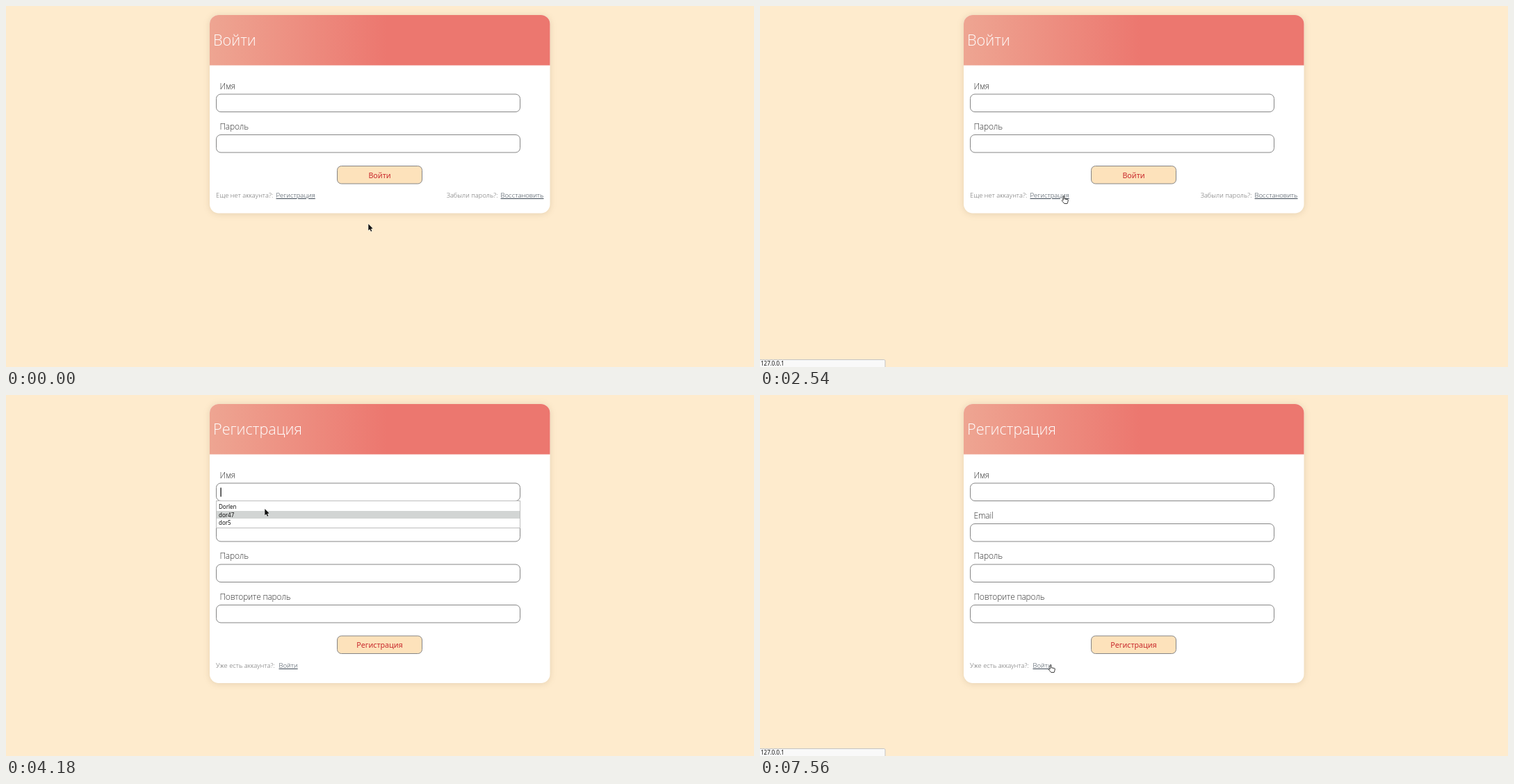
An HTML page that plays this animation: 1076x520 px, repeating every 8000 ms.

```html
<!DOCTYPE html>
<html lang="ru">
<head>
<meta charset="utf-8">
<title>Регистрация</title>
<style>
  html, body { margin: 0; width: 100%; height: 100%; overflow: hidden; background: #feebcd; }
  svg { display: block; width: 1076px; height: 520px; }

  text { font-family: "Open Sans", "Noto Sans", sans-serif; font-weight: 300; }
  .title { font-size: 21.6px; fill: #fff; }
  .label { font-size: 12px; letter-spacing: -.2px; fill: #333; }
  .note { font-size: 9.4px; fill: #666; }
  .link { font-size: 9.5px; fill: #34404c; text-decoration: underline; }
  .action { font: 400 10.7px "Noto Sans", sans-serif; fill: #c8282c; text-anchor: middle; }
  .small { font: 400 8px "Noto Sans", sans-serif; fill: #111; }
  .end { text-anchor: end; }

  .card { fill: #fff; filter: drop-shadow(0 1px 5px rgba(90, 60, 20, .15)); }
  .field { fill: #fff; stroke: #858585; }
  .button { fill: #fde2bb; stroke: #858585; }
  .panel { fill: #f9f9f9; stroke: #c4c4c4; }

  .anim { animation: 8s step-end infinite; }
  #login { animation-name: login; }
  #register { animation-name: register; }
  #caret { animation-name: caret; }
  #list { animation-name: list; }
  #active { animation-name: active; }
  #wide { animation-name: wide; }
  #narrow { animation-name: narrow; }
  #cursor { animation-name: move; }
  #arrow { animation-name: arrow; }
  #hand { animation-name: hand; }

  @keyframes login { 0% { opacity: 1 } 37%, 100% { opacity: 0 } }
  @keyframes register { 0% { opacity: 0 } 37%, 100% { opacity: 1 } }
  @keyframes caret { 0% { opacity: 1 } 78.75%, 100% { opacity: 0 } }
  @keyframes list { 0%, 87.75%, 100% { opacity: 0 } 42.25% { opacity: 1 } }
  @keyframes active { 0%, 56.25%, 100% { opacity: 0 } 52.25% { opacity: 1 } }
  @keyframes wide { 0%, 37% { opacity: 0 } 31.75%, 94.5%, 100% { opacity: 1 } }
  @keyframes narrow { 0%, 94.5%, 100% { opacity: 0 } 78.75% { opacity: .6 } 83.75% { opacity: 1 } }
  @keyframes arrow { 0%, 37% { opacity: 1 } 18.4%, 75%, 100% { opacity: 0 } }
  @keyframes hand { 0%, 37% { opacity: 0 } 18.4%, 75%, 100% { opacity: 1 } }
  @keyframes move {
    0% { transform: translate(521px, 314px) }
    6.5% { transform: translate(521px, 314px); animation-timing-function: linear }
    15.5% { transform: translate(459px, 285px); animation-timing-function: linear }
    16% { transform: translate(453px, 283px) }
    17% { transform: translate(453px, 283px); animation-timing-function: linear }
    19.5% { transform: translate(437px, 274px) }
    37% { transform: translate(437px, 275px) }
    42.25% { transform: translate(437px, 274px) }
    47% { transform: translate(417px, 235px) }
    52.25% { transform: translate(372px, 164px) }
    56.25% { transform: translate(348px, 238px) }
    61.25% { transform: translate(364px, 392px) }
    65% { transform: translate(421px, 424px) }
    70.25% { transform: translate(430px, 400px) }
    75% { transform: translate(418px, 390px) }
    87.75%, 100% { transform: translate(418px, 389px) }
  }
</style>
</head>
<body>
<svg viewBox="0 0 1076 520">
  <defs>
    <linearGradient id="coral">
      <stop offset="0" stop-color="#eea592"/>
      <stop offset=".52" stop-color="#ec776f"/>
    </linearGradient>
    <path id="head" fill="url(#coral)" d="M293 85.5V26a13 13 0 0 1 13-13H769.5a13 13 0 0 1 13 13V85.5Z"/>
    <rect id="field" class="field" x="302.5" y=".5" width="437" height="25.5" rx="6.5"/>
    <rect id="button" class="button" x="476.5" y=".5" width="122" height="25.5" rx="6"/>
  </defs>

  <rect width="1076" height="520" fill="#feebcd"/>

  <g id="login" class="anim">
    <rect class="card" x="293" y="13" width="489.5" height="285.5" rx="13"/>
    <use href="#head"/>
    <text class="title" x="298" y="57">Войти</text>
    <text class="label" x="307.5" y="119.5">Имя</text>
    <use href="#field" y="126.5"/>
    <text class="label" x="307.5" y="178">Пароль</text>
    <use href="#field" y="185"/>
    <use href="#button" y="230"/>
    <text class="action" x="537.5" y="247.5">Войти</text>
    <text class="note" x="302" y="276">Еще нет аккаунта?:</text>
    <text class="link" x="388.5" y="276">Регистрация</text>
    <text class="note end" x="707.5" y="276">Забыли пароль?:</text>
    <text class="link end" x="773.5" y="276">Восстановить</text>
  </g>

  <g id="register" class="anim">
    <rect class="card" x="293" y="13" width="489.5" height="402" rx="13"/>
    <use href="#head"/>
    <text class="title" x="298" y="57">Регистрация</text>
    <text class="label" x="307.5" y="119.5">Имя</text>
    <use href="#field" y="126.5"/>
    <text class="label" x="307.5" y="178">Email</text>
    <use href="#field" y="185"/>
    <text class="label" x="307.5" y="236">Пароль</text>
    <use href="#field" y="243.5"/>
    <text class="label" x="307.5" y="294.5">Повторите пароль</text>
    <use href="#field" y="302"/>
    <use href="#button" y="346.5"/>
    <text class="action" x="537.5" y="364">Регистрация</text>
    <text class="note" x="302" y="393">Уже есть аккаунта?:</text>
    <text class="link" x="392.5" y="393">Войти</text>
    <rect id="caret" class="anim" x="308.5" y="133.5" width="1.2" height="13"/>

    <g id="list" class="anim">
      <rect x="302.5" y="152.5" width="437" height="39" fill="#fff" stroke="#bdbdbd"/>
      <rect id="active" class="anim" x="303" y="167" width="436" height="11" fill="#d2d5d4"/>
      <text class="small" x="306" y="164.3">Dorlen</text>
      <text class="small" x="306" y="175.6">dor47</text>
      <text class="small" x="306" y="186.9">dor5</text>
    </g>
  </g>

  <g id="narrow" class="anim">
    <path class="panel" d="M-1 509.5H82a1.5 1.5 0 0 1 1.5 1.5V521H-1Z"/>
    <text class="small" x="1" y="518.3">127.0.0.1:8000/login/</text>
  </g>
  <g id="wide" class="anim">
    <path class="panel" d="M-1 509.5H178.5a1.5 1.5 0 0 1 1.5 1.5V521H-1Z"/>
    <text class="small" x="1" y="518.3">127.0.0.1</text>
  </g>

  <g id="cursor" class="anim">
    <path id="arrow" class="anim" fill="#111" stroke="#fff" stroke-width=".8" paint-order="stroke"
      d="M.3 0V9.3L2.4 7.4 3.9 10.8 5.4 10.2 3.9 6.9 6.6 6.6Z"/>
    <path id="hand" class="anim" fill="#fff" stroke="#222" stroke-width=".9" stroke-linejoin="round"
      d="M-.8 5.8V.6a.9.9 0 0 1 1.8 0V3.8L5.3 4.6a1.2 1.2 0 0 1 1 1.3L5.7 8.8 5 10.6H.8L-2.3 7a.8.8 0 0 1 1-1.4Z"/>
  </g>
</svg>
</body>
</html>
```
